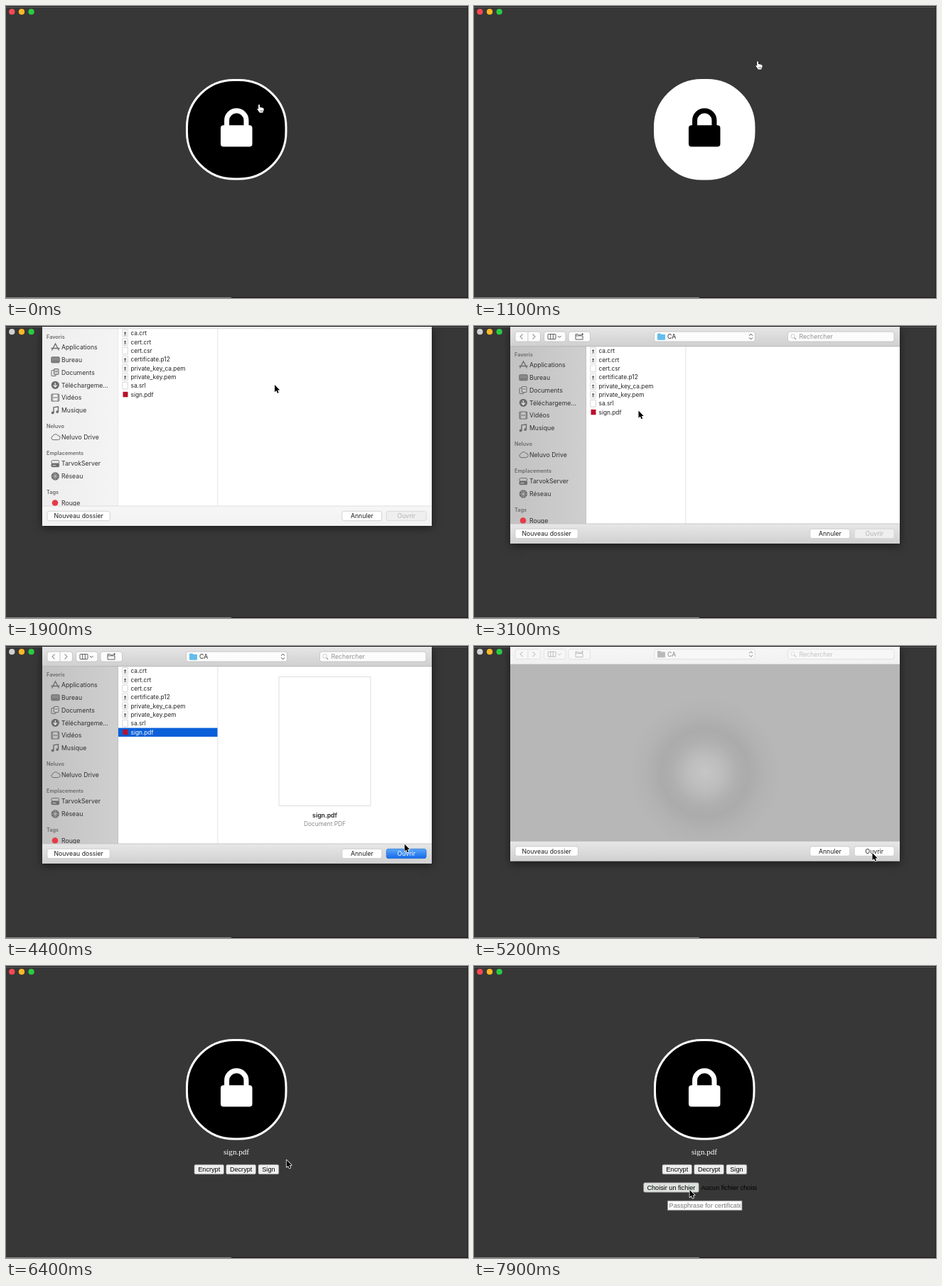
These frames come from a looping animation (650x412 px, 8 s). An HTML page with a canvas:

```html
<!DOCTYPE html>
<html lang="fr">
<head>
<meta charset="utf-8">
<style>
html, body { margin: 0; width: 100%; height: 100%; overflow: hidden; background: #373737; }
canvas { display: block; }
</style>
</head>
<body>
<canvas id="stage" width="650" height="412"></canvas>
<script>
const ctx = document.getElementById('stage').getContext('2d');
const LOOP = 8000, STEP = 100;
const UI = 'Inter, sans-serif', ARIAL = '"Liberation Sans", Arial, sans-serif';
const SHEET = { x: 51, w: 548, h: 307 };
const OPEN_AT = 1621, CLOSE_AT = 5177, SLIDE = 342;

const clamp = v => Math.max(0, Math.min(1, v));
const ease = u => (1 - Math.cos(Math.PI * clamp(u))) / 2;
const mix = (a, b, u) => a + (b - a) * u;
const grey = v => { v = Math.round(v); return `rgb(${v},${v},${v})`; };

// time, x, y of the pointer tip; equal neighbours make a pause
const pointer = [
  [0, 356, 139], [300, 362, 134], [900, 391, 88], [1100, 399, 78], [1400, 399, 78],
  [1700, 378, 83], [2200, 378, 83], [2700, 300, 103], [3100, 231.5, 119.5], [3600, 231.5, 119.5],
  [3800, 367, 147], [3900, 367, 147], [4000, 470, 210], [4100, 561, 267], [4200, 561, 267],
  [4600, 560.5, 292], [5400, 560.5, 292], [6000, 450, 253], [6600, 367, 284],
  [6900, 367, 284], [7500, 303.5, 316], [8000, 303.5, 316]
];

function pointerAt(t) {
  const i = pointer.findIndex((p, n) => n + 1 === pointer.length - 1 || t < pointer[n + 1][0]);
  const [t0, x0, y0] = pointer[i], [t1, x1, y1] = pointer[i + 1];
  const u = (t - t0) / (t1 - t0);
  return [mix(x0, x1, u), mix(y0, y1, u)];
}

function rect(x, y, w, h, fill) {
  ctx.fillStyle = fill;
  ctx.fillRect(x, y, w, h);
}

function box(x, y, w, h, r, fill, stroke, line = 0.7) {
  ctx.beginPath();
  ctx.roundRect(x, y, w, h, r);
  if (fill) { ctx.fillStyle = fill; ctx.fill(); }
  if (stroke) { ctx.strokeStyle = stroke; ctx.lineWidth = line; ctx.stroke(); }
}

function disc(x, y, r, fill) {
  ctx.beginPath();
  ctx.arc(x, y, r, 0, 7);
  ctx.fillStyle = fill;
  ctx.fill();
}

function trace(d, color, width = 1) {
  ctx.strokeStyle = color;
  ctx.lineWidth = width;
  ctx.stroke(new Path2D(d));
}

function text(s, x, y, size, color, { font = UI, align = 'left', weight = 400 } = {}) {
  ctx.font = `${weight} ${size}px ${font}`;
  ctx.textAlign = align;
  ctx.fillStyle = color;
  ctx.fillText(s, x, y);
}

function shade(y0, y1, from, to) {
  const g = ctx.createLinearGradient(0, y0, 0, y1);
  g.addColorStop(0, from);
  g.addColorStop(1, to);
  return g;
}

function windowFrame(sheetOpen) {
  rect(0, 0, 650, 412, '#373737');
  rect(0, 0, 650, 1, '#1c1c1c');
  rect(0, 1, 650, 1, '#606060');
  rect(649, 0, 1, 412, '#242424');
  rect(0, 411, 317, 1, '#8a8686');
  rect(317, 411, 333, 1, '#1d1214');
  disc(8.3, 8.2, 4.1, sheetOpen ? '#d0d0d0' : '#fc4753');
  disc(22, 8.2, 4.1, '#fdb727');
  disc(35.6, 8.2, 4.1, '#2bcb42');
}

function lockButton(light) {
  const ink = grey(255 * (1 - light));
  box(254.5, 104.5, 139.5, 139.5, 66, grey(255 * light), '#fff', 3);
  box(302, 168.2, 44.5, 30.2, 4, ink);
  trace('M310.6 170V161.4a13.7 13.7 0 0 1 27.4 0V170', ink, 7);
}

function formButton(label, x, y, w, h, fill = '#efefef') {
  box(x, y, w, h, 1.8, fill, '#8a8a8a', 0.6);
  text(label, x + w / 2, y + h / 2 + 3.3, 9.15, '#000', { font: ARIAL, align: 'center' });
}

function form(t) {
  if (t < 5600) return;
  text('sign.pdf', 324, 266, 11.1, '#fff', { font: '"Liberation Serif", serif', align: 'center' });
  formButton('Encrypt', 265, 280.3, 41.5, 13.4);
  formButton('Decrypt', 309.7, 280.3, 41.8, 13.4);
  formButton('Sign', 355, 280.3, 28.8, 13.4, t === 6600 || t === 6700 ? '#dcdcdc' : '#efefef');
  if (t < 6800) return;
  formButton('Choisir un fichier', 238.6, 305.8, 77.6, 13.4, t >= 7800 ? '#dde2de' : '#efefef');
  text('Aucun fichier choisi', 319.4, 315.8, 9.15, '#000', { font: ARIAL });
  box(272.4, 331.3, 104.6, 13.4, 0, '#fff', '#888', 0.9);
  ctx.save();
  ctx.beginPath();
  ctx.rect(274, 332, 101.3, 12);
  ctx.clip();
  text('Passphrase for certificate', 274.6, 341.2, 9.15, '#757575', { font: ARIAL });
  ctx.restore();
}

const icons = {
  apps: (y, c) => trace(`M64.5 ${y + 4.5}L69.5 ${y - 5}L74.5 ${y + 4.5}M63.5 ${y + 1.5}H75.5`, c, 1.3),
  desk: (y, c) => { box(63.8, y - 4, 11.4, 8, 1, '#8a8a8a', c, 1); rect(65, y + 1.5, 9, 1, c); },
  docs: (y, c) => { box(64, y - 3, 6, 8, 0.5, null, c, 1); box(67.5, y - 5, 6.5, 8, 0.5, '#ccc', c, 1); rect(69, y - 2, 3.5, 1, c); },
  down: (y, c) => { disc(69.3, y, 5.6, c); trace(`M69.3 ${y - 3.2}V${y + 2.6}M66.7 ${y}L69.3 ${y + 2.8}L71.9 ${y}`, '#eee', 1.2); },
  film: (y, c) => {
    box(64, y - 5, 10.6, 10, 0.5, null, c, 1);
    rect(66.5, y - 0.5, 5.6, 1, c);
    for (let i = -4; i < 5; i += 2) { rect(64, y + i, 2.4, 1, c); rect(72.2, y + i, 2.4, 1, c); }
  },
  note: (y, c) => { trace(`M67 ${y + 3.5}V${y - 4}L73.5 ${y - 5}V${y + 2}`, c, 1.4); disc(65.7, y + 3.6, 1.9, c); disc(72.2, y + 2.3, 1.9, c); },
  cloud: (y, c) => trace(`M66 ${y + 4}a2.8 2.8 0 0 1 0-5.4a3.9 3.9 0 0 1 7-.6a2.7 2.7 0 0 1 .3 6z`, c, 1),
  disk: (y, c) => { box(64, y - 4.5, 10.6, 4.5, 1.5, null, c, 1); box(64, y, 10.6, 4.5, 1, c, c, 1); rect(65.5, y + 2, 5, 0.9, '#ddd'); },
  globe: (y, c) => {
    disc(69.3, y, 5.7, c);
    trace(`M64 ${y}H74.6M69.3 ${y - 5}V${y + 5}M66 ${y - 4}Q71 ${y} 66 ${y + 4}M72.6 ${y - 4}Q67.6 ${y} 72.6 ${y + 4}`, '#d0d0d0', 0.6);
  },
  red: y => disc(69, y, 4.3, '#e63a49')
};

const sidebar = [
  ['Favoris', 40], ['Applications', 55, 'apps'], ['Bureau', 72.8, 'desk'], ['Documents', 90.5, 'docs'],
  ['Téléchargeme...', 108.3, 'down'], ['Vidéos', 126, 'film'], ['Musique', 143.8, 'note'],
  ['Neluvo', 166.3], ['Neluvo Drive', 181.6, 'cloud'],
  ['Emplacements', 204], ['TarvokServer', 219.2, 'disk'], ['Réseau', 237, 'globe'],
  ['Tags', 259.3], ['Rouge', 274.6, 'red']
];
const files = ['ca.crt', 'cert.crt', 'cert.csr', 'certificate.p12', 'private_key_ca.pem', 'private_key.pem', 'sa.srl', 'sign.pdf'];

function fileIcon(name, y) {
  if (name.endsWith('.pdf')) {
    rect(164.5, y - 4, 7, 7.5, '#b8122c');
    return;
  }
  box(163.8, y - 5.2, 7.6, 9.8, 0.5, '#fff', '#c4c4c4', 0.7);
  if (/crt|p12|pem/.test(name)) { disc(167.6, y - 0.8, 1.6, '#777'); rect(166, y + 1, 3.2, 2, '#999'); }
}

function toolbar(tone, closing) {
  rect(SHEET.x, 0, SHEET.w, 29, shade(0, 29, grey(mix(247, 231, tone)), grey(mix(241, 207, tone))));
  rect(SHEET.x, 28.4, SHEET.w, 0.8, grey(mix(215, 178, tone)));
  const edge = grey(mix(218, 185, tone)), fill = grey(mix(247, 252, tone));
  const ink = closing ? '#b5b5b5' : '#505050';
  box(58, 8, 35.5, 14, 3, fill, edge);
  rect(75.5, 8, 0.8, 14, edge);
  trace('M68.5 11.5L65 15L68.5 18.5M82.5 11.5L86 15L82.5 18.5', closing ? '#c6c6c6' : '#999', 1.1);
  box(98.5, 8, 30.5, 14, 3, fill, edge);
  box(104, 11.5, 11, 7, 0.5, null, ink, 0.9);
  trace('M107.7 11.5V18.5M111.3 11.5V18.5M118 14L120.3 16.3L122.6 14', ink, 0.9);
  box(133, 8, 30.5, 14, 3, fill, edge);
  trace('M143 19V11.5H146.5L147.5 12.8H151M143 13.8H153V19H143M152.5 10V13M151 11.5H154', ink, 0.9);
  box(253.5, 8, 142, 14, 3, fill, edge);
  const folder = closing ? '#b9b9b9' : '#62bdec';
  box(258, 10.5, 5, 4, 1, folder);
  box(258, 11.7, 11, 8, 1, folder);
  text('CA', 272, 18.2, 8.7, closing ? '#888' : '#2c2c2c');
  trace('M387.3 13.6L389.6 11.2L391.9 13.6M387.3 16.4L389.6 18.8L391.9 16.4', closing ? '#888' : '#444', 1);
  box(441.5, 8, 149.5, 14, 3, fill, edge);
  ctx.beginPath();
  ctx.arc(448.6, 14.3, 2.8, 0, 7);
  ctx.stroke();
  trace('M450.6 16.4L453 19', closing ? '#a8a8a8' : '#666', 1);
  text('Rechercher', 457.5, 18.2, 8.7, closing ? '#c4c4c4' : '#929292');
}

function browser(t, tone) {
  const side = ctx.createLinearGradient(SHEET.x, 0, 158, 0);
  side.addColorStop(0, grey(mix(238, 194, tone)));
  side.addColorStop(1, grey(mix(244, 207, tone)));
  rect(SHEET.x, 29, 107, 250, side);
  rect(157.4, 29, 0.8, 250, grey(mix(222, 184, tone)));
  rect(158, 29, 441, 250, '#fff');
  rect(297.5, 29, 0.8, 250, '#dcdcdc');
  for (const [label, y, icon] of sidebar) {
    if (icon) {
      icons[icon](y, '#6c6c6c');
      text(label, 78, y + 3.2, 8.7, '#303030');
    } else text(label, 57, y + 2.7, 7.3, '#6a6a6a', { weight: 600 });
  }
  files.forEach((name, i) => {
    const y = 35.5 + i * 12.33, chosen = i === 7 && t >= 3200;
    if (chosen) rect(158, y - 6.2, 139.5, 12.4, '#0a60d8');
    fileIcon(name, y);
    text(name, 175.5, y + 2.9, 8.3, chosen ? '#fff' : '#222');
  });
  if (t >= 3400) {
    box(384, 43.5, 129, 182, 0, '#fff', '#cfcfcf');
    text('sign.pdf', 448.5, 242, 8.7, '#222', { align: 'center', weight: 600 });
    text('Document PDF', 448.5, 254, 8.3, '#888', { align: 'center' });
  }
}

function blurredBackdrop(offset) {
  rect(SHEET.x, 29, SHEET.w, 250, '#b7b7b7');
  const y = 179 - offset;
  const glow = ctx.createRadialGradient(325, y, 0, 325, y, 108);
  [[0, 197], [0.2, 190], [0.43, 175], [0.57, 171], [0.78, 179], [1, 183]]
    .forEach(([at, v]) => glow.addColorStop(at, grey(v)));
  ctx.save();
  ctx.beginPath();
  ctx.rect(SHEET.x, 29, SHEET.w, 250);
  ctx.clip();
  disc(325, y, 108, glow);
  ctx.restore();
}

function dialogButton(label, x, w, state = 'plain') {
  const look = {
    plain: ['#fff', '#c2c2c2', '#1c1c1c'],
    off: ['#efefef', '#d2d2d2', '#b2b2b2'],
    main: [shade(286, 300, '#5ba8fa', '#1267ea'), '#2d72cf', '#fff'],
    down: [shade(286, 300, '#3c83df', '#0b4dc0'), '#1f55a5', '#fff']
  }[state];
  box(x, 286.3, w, 13.4, 2.8, look[0], look[1]);
  text(label, x + w / 2, 296.2, 8.7, look[2], { align: 'center' });
}

function sheet(t) {
  if (t < OPEN_AT || t > CLOSE_AT + SLIDE) return;
  const closing = t >= CLOSE_AT;
  const shown = closing ? 1 - ease((t - CLOSE_AT) / SLIDE) : ease((t - OPEN_AT) / SLIDE);
  const offset = (shown - 1) * SHEET.h, bottom = SHEET.h + offset;
  if (bottom < 2) return;
  const tone = clamp((t - 1900) / 300);

  ctx.save();
  ctx.shadowColor = 'rgba(0,0,0,.5)';
  ctx.shadowBlur = 11;
  ctx.shadowOffsetY = 3;
  rect(SHEET.x, 1, SHEET.w, bottom - 1, '#ccc');
  ctx.restore();

  ctx.save();
  ctx.beginPath();
  ctx.rect(SHEET.x, 1, SHEET.w, bottom - 1);
  ctx.clip();
  ctx.translate(0, offset);
  if (closing) blurredBackdrop(offset); else browser(t, tone);
  toolbar(closing ? 0 : tone, closing);
  rect(SHEET.x, 279, SHEET.w, 28, shade(279, 307, grey(mix(246, 231, tone)), grey(mix(242, 208, tone))));
  rect(SHEET.x, 278.6, SHEET.w, 0.8, grey(mix(214, 190, tone)));
  dialogButton('Nouveau dossier', 58, 88.3);
  dialogButton('Annuler', 472.8, 56);
  dialogButton('Ouvrir', 535.2, 56, closing ? 'plain' : t >= 5000 ? 'down' : t >= 3400 ? 'main' : 'off');
  ctx.restore();
}

function cursor(t) {
  const [x, y] = pointerAt(t);
  const hand = t < 1500;
  const shape = new Path2D(hand
    ? 'M-.9 .8Q0-.6 1 .8V4L2.2 3.7L3.2 4.4L4.4 4.3L5.2 5.1L6.6 5.4V8.4L5.4 10.5V11.6H.8L-1.2 8.6L-2.6 6.4Q-2.2 5.2-.8 6.6Z'
    : 'M0 0V10.2L2.3 8.1L4 11.8L5.7 11L4.1 7.4H7.2Z');
  ctx.save();
  ctx.translate(x, y);
  ctx.lineJoin = 'round';
  ctx.strokeStyle = hand ? '#111' : '#fff';
  ctx.lineWidth = hand ? 1 : 1.5;
  ctx.stroke(shape);
  ctx.fillStyle = hand ? '#fff' : '#000';
  ctx.fill(shape);
  if (hand) trace('M1.8 8V10M3.4 8V10M5 8V10', '#333', 0.6);
  ctx.restore();
}

function draw(t) {
  windowFrame(t >= 1400 && t < 5600);
  lockButton(t < 3000 ? ease(t / 1100) : 0);
  form(t);
  sheet(t);
  cursor(t);
}

const start = performance.now();
function tick() {
  const t = (performance.now() - start) % LOOP;
  draw(Math.floor(t / STEP) * STEP);
  requestAnimationFrame(tick);
}
tick();
</script>
</body>
</html>
```
